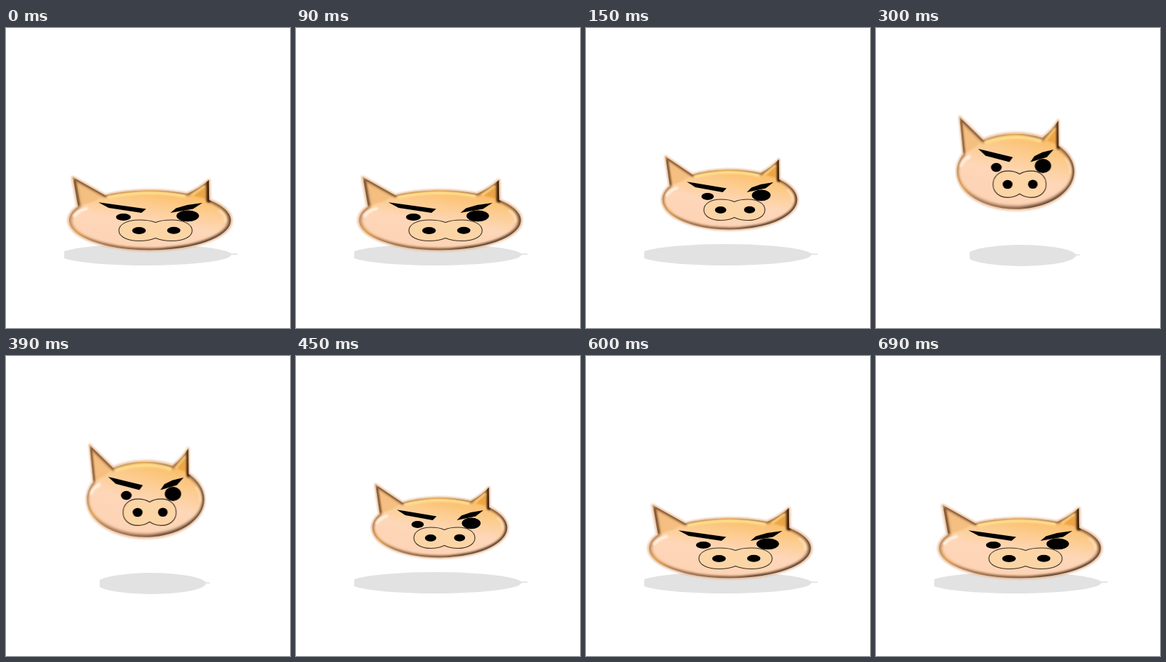
An HTML page that plays this animation: 400 by 422 pixels, repeating every 0.75 s.

```html
<!DOCTYPE html>
<html lang="en">
<head>
<meta charset="utf-8">
<title>Bouncing pig</title>
<style>
  html, body { margin: 0; width: 100%; height: 100%; overflow: hidden; background: #fff; }
  svg { display: block; width: 100%; height: 100%; }

  .head, .shadow { animation: 750ms step-end infinite; transform-origin: 0 0; }
  .head { animation-name: hop; }
  .shadow { animation-name: shrink; }

  /* squashed on the ground, relaxed midway, stretched at the top */
  @keyframes hop {
    0%, 80%, 100% { transform: matrix(1.2, 0, 0, 1, -40.2, 29); }
    20%, 60% { transform: matrix(1, 0, 0, 1, 0, 0); }
    40% { transform: matrix(.87, 0, 0, 1.26, 20.4, -102.5); }
  }
  @keyframes shrink {
    0%, 60%, 100% { transform: matrix(1, 0, 0, 1, 0, 0); }
    40% { transform: matrix(.635, 0, 0, 1, 79.9, 1); }
  }
</style>
</head>
<body>
<svg viewBox="0 0 400 422" xmlns="http://www.w3.org/2000/svg">
  <defs>
    <path id="outline" d="M112 181 L150 206.5 A95 42 0 0 1 246 204.2 Q262 196 271.5 185 L272 212.9 A95 42 0 1 1 118 222.3 Z"/>
    <clipPath id="inside"><use href="#outline"/></clipPath>
    <clipPath id="floor"><rect x="82" y="300" width="244" height="40"/></clipPath>
    <linearGradient id="skin" gradientUnits="userSpaceOnUse" x1="215" y1="192" x2="200" y2="284">
      <stop offset="0" stop-color="#fbb95c"/>
      <stop offset=".3" stop-color="#fccb8c"/>
      <stop offset=".58" stop-color="#fed7b8"/>
      <stop offset="1" stop-color="#fdd3b4"/>
    </linearGradient>
    <linearGradient id="rim" gradientUnits="userSpaceOnUse" x1="150" y1="190" x2="220" y2="290">
      <stop offset=".14" stop-color="#b98558"/>
      <stop offset=".3" stop-color="#dc9a44"/>
      <stop offset=".47" stop-color="#a87850"/>
      <stop offset=".88" stop-color="#80583c"/>
      <stop offset="1" stop-color="#5f402b"/>
    </linearGradient>
    <filter id="soft" x="-20%" y="-30%" width="140%" height="160%"><feGaussianBlur stdDeviation="1.2"/></filter>
    <!-- fixed region, so that upright strokes blur too -->
    <filter id="line" filterUnits="userSpaceOnUse" x="90" y="165" width="230" height="135"><feGaussianBlur stdDeviation="1.1"/></filter>
    <filter id="softer" x="-20%" y="-30%" width="140%" height="160%"><feGaussianBlur stdDeviation="1.7"/></filter>
  </defs>

  <rect width="400" height="422" fill="#fff"/>

  <g class="shadow" fill="#e2e2e2">
    <g clip-path="url(#floor)">
      <ellipse cx="196" cy="319" rx="121" ry="15"/>
      <path d="M310 314 L318 317.2 H326 V319 H318 L310 323Z"/>
    </g>
  </g>

  <g class="head">
    <use href="#outline" fill="none" stroke="#e3b48c" stroke-width="4" stroke-linejoin="round" filter="url(#soft)" opacity=".8"/>
    <use href="#outline" fill="url(#skin)"/>

    <g clip-path="url(#inside)" fill="none" stroke-linecap="round">
      <path d="M112 181 L150 206 L136 215 L118 222Z" fill="#f4bf80" filter="url(#soft)"/>
      <path d="M272 185 V212 L246 205Z" fill="#eda445" filter="url(#soft)"/>
      <use href="#outline" stroke="url(#rim)" stroke-width="6" filter="url(#softer)"/>
      <path d="M114 186 L119 220 M116 184 L150 207" stroke="#75502f" stroke-width="2.6" filter="url(#line)"/>
      <path d="M271.5 186 V214" stroke="#3d2410" stroke-width="5" filter="url(#line)"/>
      <path d="M252 206 L266 194" stroke="#ffd27a" stroke-width="3" filter="url(#line)"/>
      <path d="M154 209 Q200 198 243 207.5" stroke="#ffe08e" stroke-width="4" filter="url(#line)"/>
      <path d="M114 235 Q118 228 128 225" stroke="#fff1df" stroke-width="4" filter="url(#line)"/>
      <path d="M284 228 Q292 234 291 243" stroke="#ffe9d4" stroke-width="3" filter="url(#line)" opacity=".6"/>
    </g>

    <path d="M209 244.5 C204 242 197 241 190 241 C176 241 166 247 166 256 C166 264.5 176 270.5 190 270.5 C197 270.5 204 269 209 266.5 C214 269 221 270.5 228 270.5 C242 270.5 252 264.5 252 256 C252 247 242 241 228 241 C221 241 214 242 209 244.5Z"
      fill="#fcd5a6" stroke="#3a291b" stroke-width="1.1" vector-effect="non-scaling-stroke"/>

    <g fill="#000">
      <path d="M142 216.3 L153 218 L198 225.5 L192.5 231 L154 224Z"/>
      <path d="M226.5 231 L233 224.5 L246 220 L264 217 L253 225.5Z"/>
      <ellipse cx="171.3" cy="237" rx="8.7" ry="5"/>
      <ellipse cx="246.8" cy="235.3" rx="13.2" ry="7.9"/>
      <ellipse cx="189.6" cy="256" rx="8" ry="5"/>
      <ellipse cx="230.4" cy="255.8" rx="7.8" ry="5"/>
    </g>
  </g>
</svg>
</body>
</html>
```
